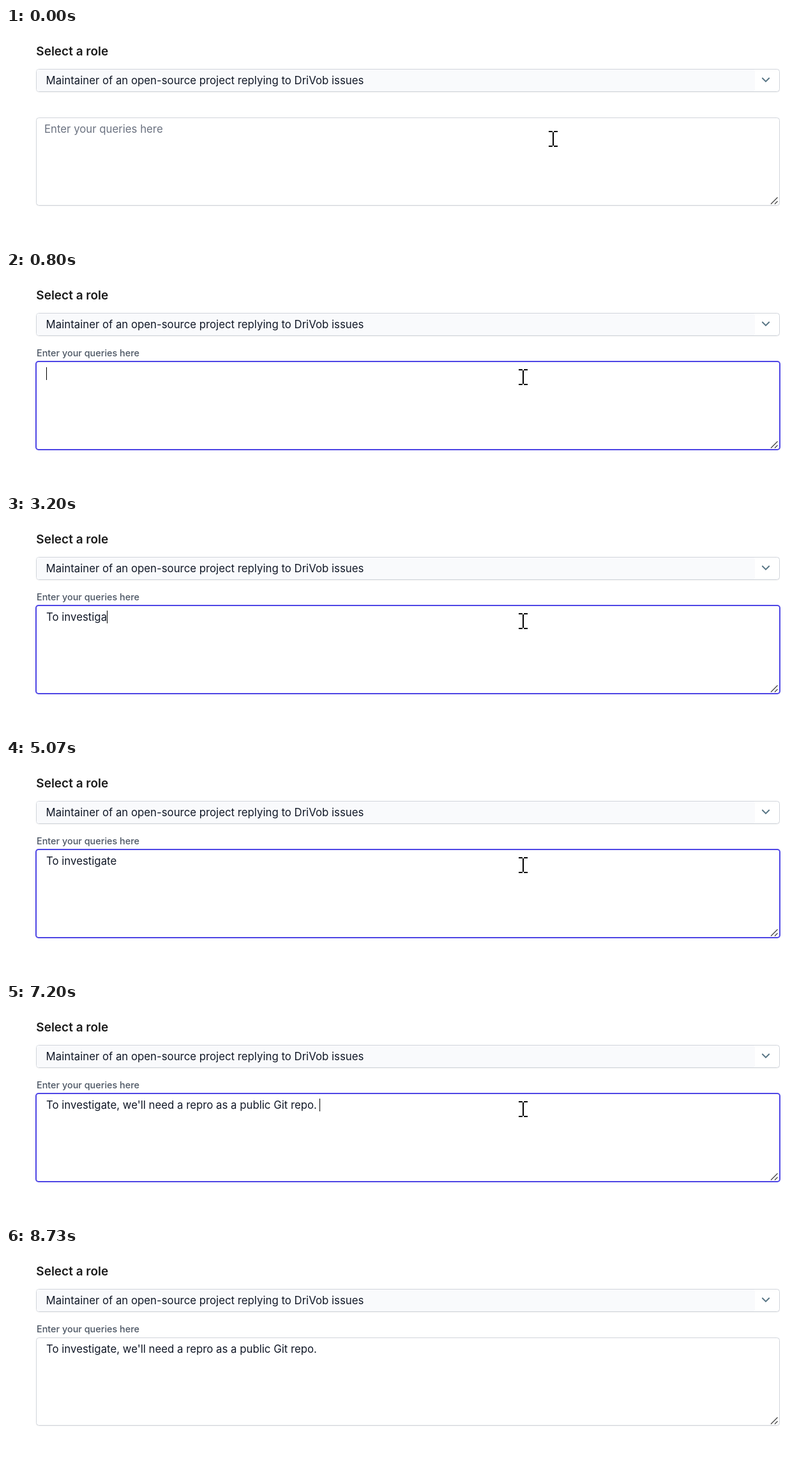
Recreate the animation shown at these times as an HTML page. Size 1253 by 338 pixels, loop 8.94 s.

```html
<!DOCTYPE html>
<html lang="en">
<head>
<meta charset="utf-8">
<title>Smart text area</title>
<style>
  html, body { margin: 0; width: 100%; height: 100%; overflow: hidden; background: #fff; }
  svg { display: block; width: 1253px; height: 338px; }
  text {
    font: 400 16.8px Inter, "Liberation Sans", sans-serif;
    font-optical-sizing: none;
    white-space: pre;
    fill: #111827;
  }
  #title { font-size: 19px; font-weight: 600; fill: #1a1a1a; }
  #hint { fill: #999; }
  .field { fill: #fff; stroke: #d1d5db; }
  .shadow { fill: none; stroke: #000; stroke-opacity: .05; }
</style>
</head>
<body>
<svg viewBox="0 0 1253 338">
  <text id="title" x="47.3" y="43">Select a role</text>

  <rect class="shadow" x="47.5" y="65.5" width="1164" height="35" rx="4"/>
  <rect class="field" x="47.5" y="64.5" width="1164" height="35" rx="4"/>
  <rect x="48" y="65" width="1125" height="34" rx="3" fill="#f9fafc"/>
  <text x="62.6" y="88">Maintainer of an open-source project replying to DriVob issues</text>
  <path d="M1184.3 78l5.7 5.7 5.7-5.7" fill="none" stroke="#557383" stroke-width="1.8"/>

  <rect class="shadow" x="47.5" y="141.5" width="1164" height="137" rx="4"/>
  <rect class="field" x="47.5" y="140.5" width="1164" height="137" rx="4"/>
  <rect id="focus" x="47" y="140" width="1165" height="138" rx="4" fill="#fff" stroke="#4f46e5" stroke-width="2"/>
  <path d="M1198 275.5l10.5-10.5M1204 275.5l4.5-4.5" stroke="#444" stroke-width="1.2"/>

  <text id="label">Enter your queries here</text>
  <text id="typed" x="63" y="164"></text>
  <text id="hint" y="164"></text>
  <rect id="caret" width="1" height="20"/>

  <path id="beam" d="M-7-13h6v2h2v-2h6v2h-6v21h6v2h-6v-2h-2v2h-6v-2h6v-21h-6z"/>
  <path id="arrow" d="M.5.5v17l4-3.8 2.7 6.2 2.8-1.2-2.7-6H13z" fill="#fff" stroke="#000"/>
</svg>
<script>
const LOOP = 8940, BLINK = 530, STEP = 1000 / 15;
const FOCUS = 530, LAST_KEY = 3470, SUGGEST = 6270, ACCEPT = 7200, THANK = 8330, BLUR = 8730;
const FIRST = "To investigate";
const REST = ", we'll need a repro as a public Git repo.";
const FULL = FIRST + REST + " ";
const THANKS = "Thank you for contacting us.";
const TEXT_X = 63;

const $ = id => document.getElementById(id);
const [focusRing, label, typed, hint, caret, beam, arrow] =
  ["focus", "label", "typed", "hint", "caret", "beam", "arrow"].map($);

const mix = (a, b, p) => a + (b - a) * p;
const easeOut = p => 1 - (1 - p) ** 3;
const easeInOut = p => p * p * (3 - 2 * p);
const show = (node, on) => node.setAttribute("visibility", on ? "visible" : "hidden");

const tick = t => Math.floor((t + 4) / STEP) * STEP;
const progress = (t, from, length) => Math.min(1, Math.max(0, (tick(t) - from) / length));

// Typing gets slightly faster toward the last key.
function keyTime(n) {
  const left = FIRST.length - n;
  return LAST_KEY - 140 * left - 1.9 * left * left;
}

function keysTyped(t) {
  let n = 0;
  while (n < FIRST.length && keyTime(n + 1) <= t) n++;
  return n;
}

function suggestionAt(t) {
  if (t >= THANK && t < BLUR) return THANKS;
  return t >= SUGGEST && t < ACCEPT ? REST : "";
}

function drawLabel(t) {
  const floating = t >= FOCUS;
  const p = easeOut(progress(t, 500, 300));
  label.setAttribute("x", mix(60, 48, p));
  label.setAttribute("y", mix(164, 132, p));
  label.style.fontSize = mix(16.8, 14.4, p) + "px";
  label.style.fontWeight = floating ? 500 : 400;
  label.style.fill = floating ? "#4b5563" : "#6b7280";
}

function drawText(t) {
  const focused = t >= FOCUS && t < BLUR;
  const keys = keysTyped(t);
  const suggestion = suggestionAt(t);
  typed.textContent = t >= ACCEPT ? FULL : FIRST.slice(0, keys);
  hint.textContent = suggestion;

  const end = TEXT_X + (keys ? typed.getComputedTextLength() : 0);
  hint.setAttribute("x", end);
  caret.setAttribute("x", Math.floor(end));
  caret.setAttribute("y", suggestion || !keys ? 149 : 148);

  const edits = [FOCUS, keys ? keyTime(keys) : 0, SUGGEST, ACCEPT, THANK];
  const lastEdit = Math.max(...edits.filter(at => at <= t));
  show(caret, focused && Math.floor((t - lastEdit) / BLINK) % 2 === 0);
  show(focusRing, focused);
}

function drawPointer(t) {
  const enter = progress(t, 0, 5 * STEP);
  const leave = easeInOut(progress(t, 7667, 600));
  const curve = (a, b, c) => mix(mix(a, b, enter), mix(b, c, enter), enter);
  const x = mix(curve(857, 824, 810), 300, leave);
  const y = mix(curve(174, 150, 165), 346, leave);
  const outside = y > 278;
  for (const node of [beam, arrow])
    node.setAttribute("transform", `translate(${Math.round(x)} ${Math.round(y)})`);
  show(beam, !outside);
  show(arrow, outside && y < 338);
}

function render(now) {
  const t = Math.max(0, now - start) % LOOP;
  drawLabel(t);
  drawText(t);
  drawPointer(t);
  requestAnimationFrame(render);
}

const start = performance.now();
render(start);
</script>
</body>
</html>
```
